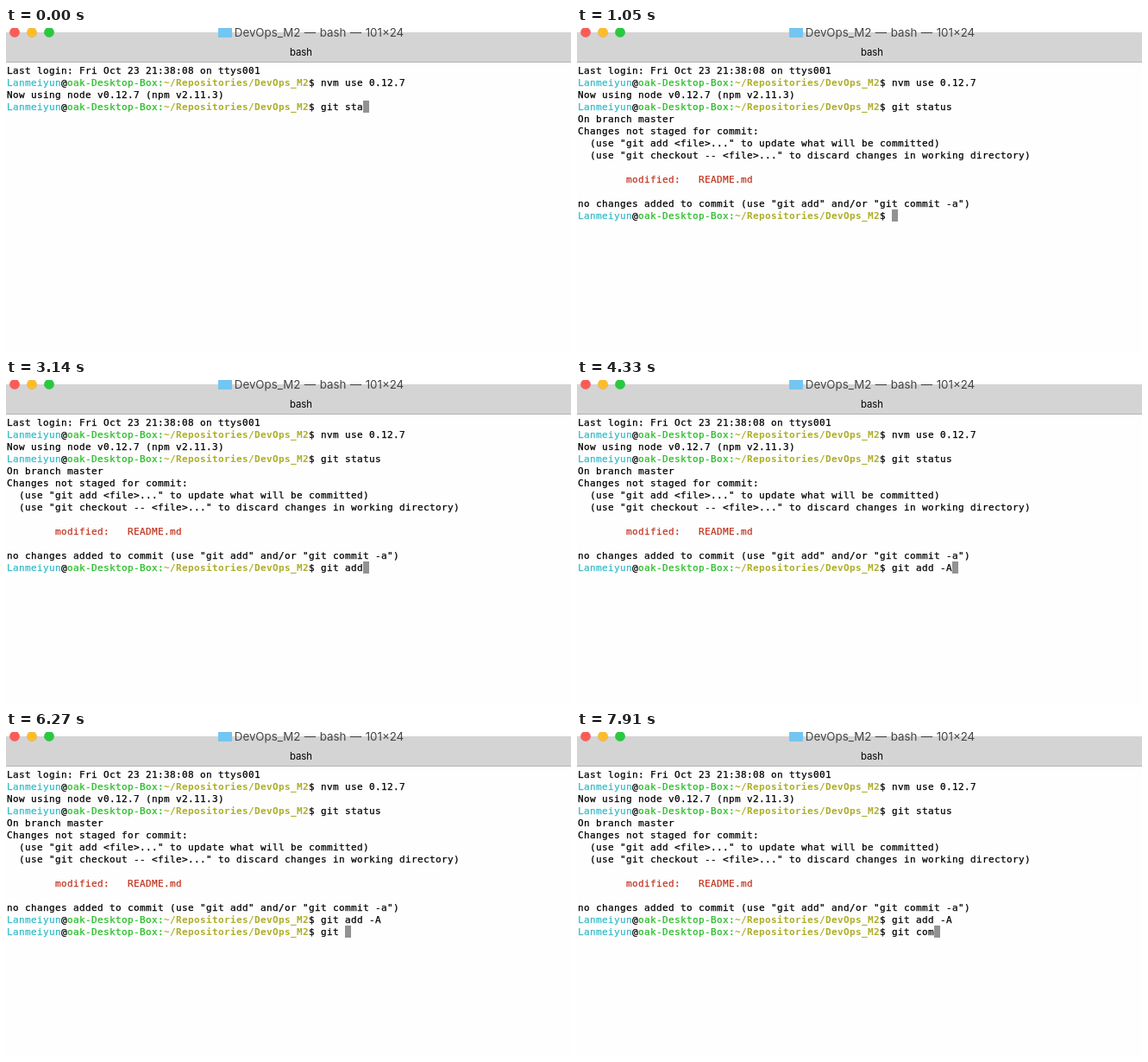
Animation of 655x375 px, one loop 8 s. Source, as an HTML page:

```html
<!DOCTYPE html>
<html lang="en">
<head>
<meta charset="utf-8">
<title>Terminal session</title>
<style>
  html, body { margin: 0; width: 100%; height: 100%; overflow: hidden; background: #fefefe; }
  svg { display: block; }
  .ui { font-family: Inter, "Liberation Sans", sans-serif; text-anchor: middle; }
  .lights { stroke: rgba(0, 0, 0, .12); stroke-width: .5; }
  #screen { font: 11px "DejaVu Sans Mono", Menlo, monospace; }
  #screen text { white-space: pre; fill: currentColor; stroke: currentColor; stroke-width: .25; }
  .plain { color: #000; }
  .user { color: #33bbc8; }
  .host { color: #25bc24; }
  #screen .path { color: #adad27; font-weight: bold; stroke: none; }
  .changed { color: #c23621; }
</style>
</head>
<body>
<svg width="655" height="375" viewBox="0 0 655 375">
  <rect width="655" height="375" fill="#fefefe"/>
  <rect y="5" width="655" height="34" fill="#d4d4d4"/>
  <rect y="39" width="655" height="1" fill="#b2b2b2"/>
  <g class="lights">
    <circle cx="10" cy="5" r="5.8" fill="#fc5b57"/>
    <circle cx="30" cy="5" r="5.8" fill="#fdbc2e"/>
    <circle cx="50" cy="5" r="5.8" fill="#28c940"/>
  </g>
  <path d="M246 0h16v10q0 1 -1 1h-14q-1 0 -1 -1z" fill="#74c6f1"/>
  <text class="ui" x="363" y="10" font-size="13.3" word-spacing=".8" fill="#444">DevOps_M2 — bash — 101×24</text>
  <text class="ui" x="342" y="32" font-size="11.3">bash</text>
  <rect id="cursor" width="7" height="14" fill="#929292"/>
  <g id="screen"></g>
</svg>
<script>
const LOOP = 8000, CELL = 7, LINE = 14, LEFT = 1, TOP = 42, BASELINE = 11;
const screen = document.getElementById('screen');
const cursor = document.getElementById('cursor');

const plain = text => [['plain', text]];
const prompt = command => [
  ['user', 'Lanmeiyun'], ['plain', '@'], ['host', 'oak-Desktop-Box:'],
  ['path', '~/Repositories/DevOps_M2'], ['plain', '$ ' + command]
];

const intro = [
  plain('Last login: Fri Oct 23 21:38:08 on ttys001'),
  prompt('nvm use 0.12.7'),
  plain('Now using node v0.12.7 (npm v2.11.3)')
];
const status = [
  plain('On branch master'),
  plain('Changes not staged for commit:'),
  plain('  (use "git add <file>..." to update what will be committed)'),
  plain('  (use "git checkout -- <file>..." to discard changes in working directory)'),
  plain(''),
  [['plain', '        '], ['changed', 'modified:   README.md']],
  plain(''),
  plain('no changes added to commit (use "git add" and/or "git commit -a")')
];

// Each command: text already typed, remaining keys, time of each key, time of Enter, output
const commands = [
  { start: 'git sta', keys: 'tus', times: [150, 300, 600], enter: 1050, output: status },
  { start: '', keys: 'git add -A', enter: 5080, output: [],
    times: [1800, 1950, 2100, 2250, 2700, 3000, 3140, 3440, 3740, 4330] },
  { start: '', keys: 'git com', enter: Infinity, output: [],
    times: [5680, 5830, 5970, 6270, 7310, 7460, 7910] }
];

function linesAt(time) {
  const lines = [...intro];
  for (const c of commands) {
    const count = c.times.filter(t => t <= time).length;
    lines.push(prompt(c.start + c.keys.slice(0, count)));
    if (time < c.enter) break;
    lines.push(...c.output);
  }
  return lines;
}

function drawLine(runs, row) {
  let col = 0;
  for (const [kind, text] of runs) {
    const first = col;
    col += text.length;
    if (!text.trim()) continue;
    const node = document.createElementNS('http://www.w3.org/2000/svg', 'text');
    node.setAttribute('class', kind);
    node.setAttribute('x', Array.from(text, (_, i) => LEFT + (first + i) * CELL).join(' '));
    node.setAttribute('y', TOP + row * LINE + BASELINE);
    node.textContent = text;
    screen.append(node);
  }
  return col;
}

let shown = '';
function render(time) {
  const lines = linesAt(time);
  const key = JSON.stringify(lines);
  if (key === shown) return;
  shown = key;
  screen.replaceChildren();
  let col = 0;
  lines.forEach((runs, row) => { col = drawLine(runs, row); });
  cursor.setAttribute('x', LEFT + col * CELL);
  cursor.setAttribute('y', TOP + (lines.length - 1) * LINE);
}

const begin = performance.now();
function tick() {
  render((performance.now() - begin) % LOOP);
  requestAnimationFrame(tick);
}
tick();
</script>
</body>
</html>
```
